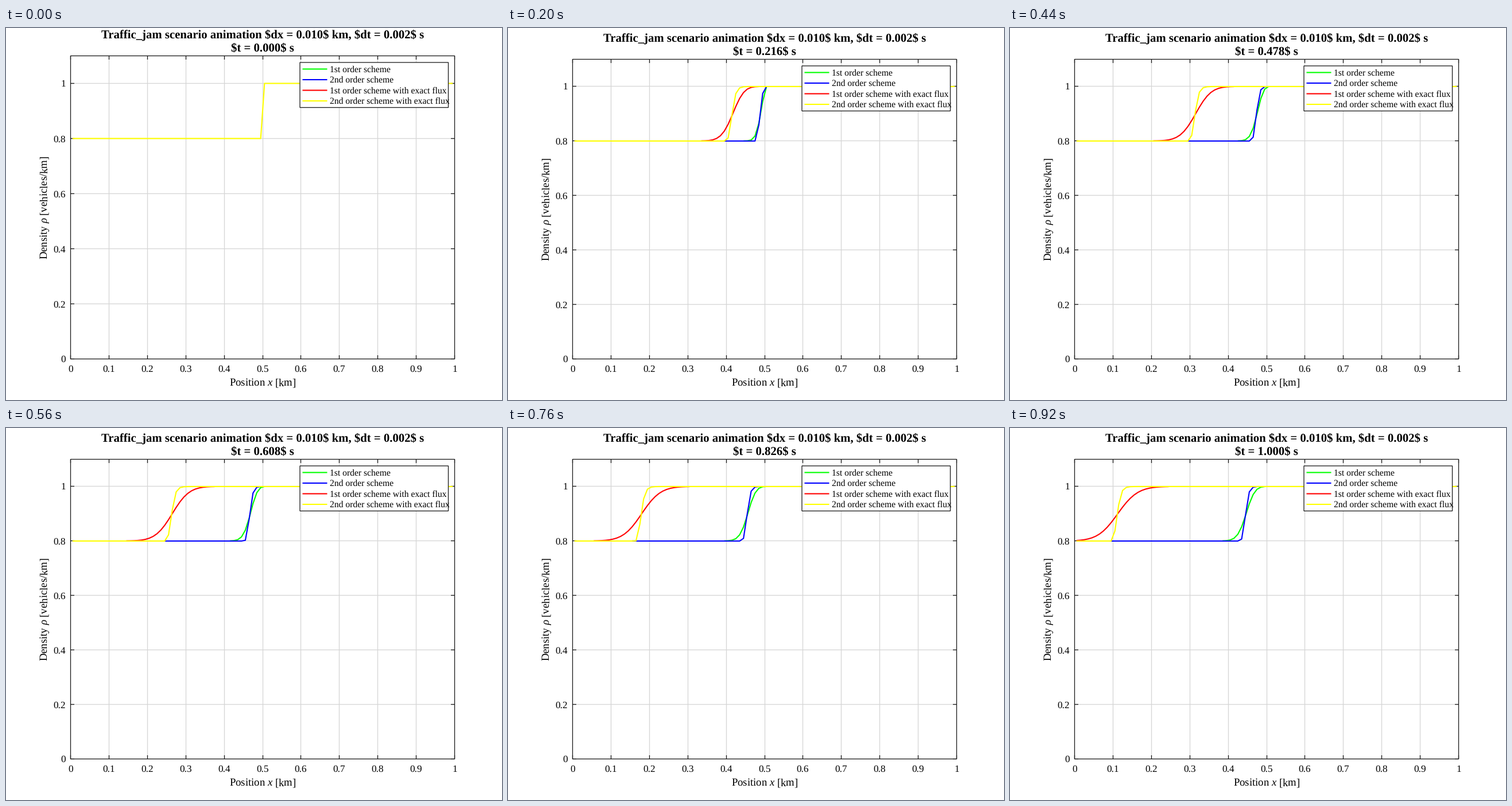
A matplotlib script for the animation above (0.96 s loop, 864x648 px).

```python
import numpy as np
import matplotlib.pyplot as plt
from matplotlib.animation import FuncAnimation
from matplotlib.patches import Rectangle

plt.rcParams.update({
    "font.family": "Liberation Serif",
    "text.hinting": "none",
    "path.snap": False,
    "mathtext.fontset": "custom",
    "mathtext.rm": "Liberation Serif",
    "mathtext.it": "Liberation Serif:italic",
})

W, H, DPI = 864, 648, 72
FRAMES, INTERVAL = 24, 40
DX, DT, STEPS = 0.01, 0.002, 500

LEFT, RIGHT, BOTTOM = 112.5, 781.5, 576.5
Y_MAX = 1.1
INK = "#1a1a1a"
GRID = "#d6d6d6"
YELLOW = "#ffff00"


# --- traffic model: waves travel to the left, so the flux is taken upwind ---

def smooth_flux(r):
    return 0.0675 * r * (1 - r)


def log_flux(r):
    return -r * np.log10(r)


def superbee_slope(r):
    d = np.diff(np.pad(r, 1, mode="edge"))
    a, b = abs(d[:-1]), abs(d[1:])
    size = np.maximum(np.minimum(2 * a, b), np.minimum(a, 2 * b))
    return np.where(d[:-1] * d[1:] > 0, np.sign(d[1:]) * size, 0)


def rate(r, flux, second):
    g = flux(r - superbee_slope(r) / 2 if second else r)
    return -(np.append(g[1:], g[-1]) - g) / DX


def solve(flux, second):
    r = np.where(X < 0.5, 0.8, 1.0)
    history = [r]
    for _ in range(STEPS):
        k = rate(r, flux, second)
        if second:
            k = (k + rate(r + DT * k, flux, second)) / 2
        r = r + DT * k
        history.append(r)
    return history


X = np.arange(DX / 2, 1, DX)
SCHEMES = [
    ("1st order scheme", "#00ff00", solve(smooth_flux, False)),
    ("2nd order scheme", "#0000ff", solve(smooth_flux, True)),
    ("1st order scheme with exact flux", "#ff0000", solve(log_flux, False)),
    ("2nd order scheme with exact flux", YELLOW, solve(log_flux, True)),
]


def visible(r, later):
    """Blank the stretches that a later line covers completely."""
    covered = np.zeros(len(r), bool)
    for other in later:
        same = np.pad(abs(r - other) < 5e-4, 1, constant_values=True)
        covered |= same[:-2] & same[1:-1] & same[2:]
    return np.where(covered, np.nan, r)


# --- drawing in pixels, y downwards ---

fig = plt.figure(figsize=(W / DPI, H / DPI), dpi=DPI, facecolor="white")
ax = fig.add_axes([0, 0, 1, 1])


def to_x(v):
    return LEFT + v * (RIGHT - LEFT)


def center(p):
    return np.floor(p) + 0.5


def line(x, y, color=INK, width=1.3, z=2):
    ax.plot(x, y, color=color, lw=width, zorder=z,
            solid_capstyle="butt", solid_joinstyle="round")


def label(x, y, s, size, ha="center", math=False, **kw):
    ax.text(x, y, s, fontsize=size, ha=ha, va="baseline", color="black",
            parse_math=math, zorder=9, **kw)


def box(x0, y0, x1, y1, z, fill):
    ax.add_patch(Rectangle((x0, y0), x1 - x0, y1 - y0, lw=1.3, ec=INK,
                           fc="white" if fill else "none", zorder=z))


def draw_axes(top, to_y):
    for i in range(11):
        x = center(to_x(i / 10))
        if 0 < i < 10:
            line([x, x], [top, BOTTOM], GRID, z=1)
        line([x, x], [BOTTOM, BOTTOM - 6.5])
        line([x, x], [top, top + 6.5])
        label(x, 599, f"{i / 10:g}", 17.2)
    for i in range(6):
        y = center(to_y(i / 5))
        if i:
            line([LEFT, RIGHT], [y, y], GRID, z=1)
        line([LEFT, LEFT + 6.5], [y, y])
        line([RIGHT, RIGHT - 6.5], [y, y])
        label(104, y + 5.8, f"{i / 5:g}", 17.2, "right")
    box(LEFT, top, RIGHT, BOTTOM, 3, False)
    label(447, 623, "Position $x$ [km]", 18.7, math=True)
    label(73, (top + BOTTOM) / 2, r"Density $\rho$ [vehicles/km]", 18.7,
          math=True, rotation=90, rotation_mode="anchor")


def draw_legend(top):
    box(512, top + 11.5, 770.5, top + 90, 6, True)
    for i, (name, color, _) in enumerate(SCHEMES):
        y = top + 23 + 18.5 * i
        line([516.5, 559.5], [y, y], color, 2.1, 7)
        label(564, y + 5.2, name, 15.65, "left")


def draw(k):
    ax.clear()
    ax.set_xlim(0, W)
    ax.set_ylim(H, 0)
    ax.axis("off")

    # the plot area is slightly taller at the very start
    top = 48.5 if k == 0 else 54.5

    def to_y(v):
        return BOTTOM - v / Y_MAX * (BOTTOM - top)

    n = k * STEPS // (FRAMES - 1)
    draw_axes(top, to_y)

    # the starting profile lingers for one step
    if k == 1:
        line(to_x(X), to_y(SCHEMES[-1][2][0]), YELLOW, 2.1, 4)
    curves = [history[n] for _, _, history in SCHEMES]
    for i, (_, color, _) in enumerate(SCHEMES):
        r = visible(curves[i], curves[i + 1:])
        line(to_x(X), to_y(r), color, 2.1, 5)

    draw_legend(top)
    title = "Traffic_jam scenario animation $dx = 0.010$ km, $dt = 0.002$ s"
    label(447.3, top - 31, title, 20.7, weight="bold")
    label(447.3, top - 8, f"$t = {n * DT:.3f}$ s", 20.7, weight="bold")


anim = FuncAnimation(fig, draw, frames=FRAMES, interval=INTERVAL,
                     repeat=True, repeat_delay=0)
plt.show()
```
